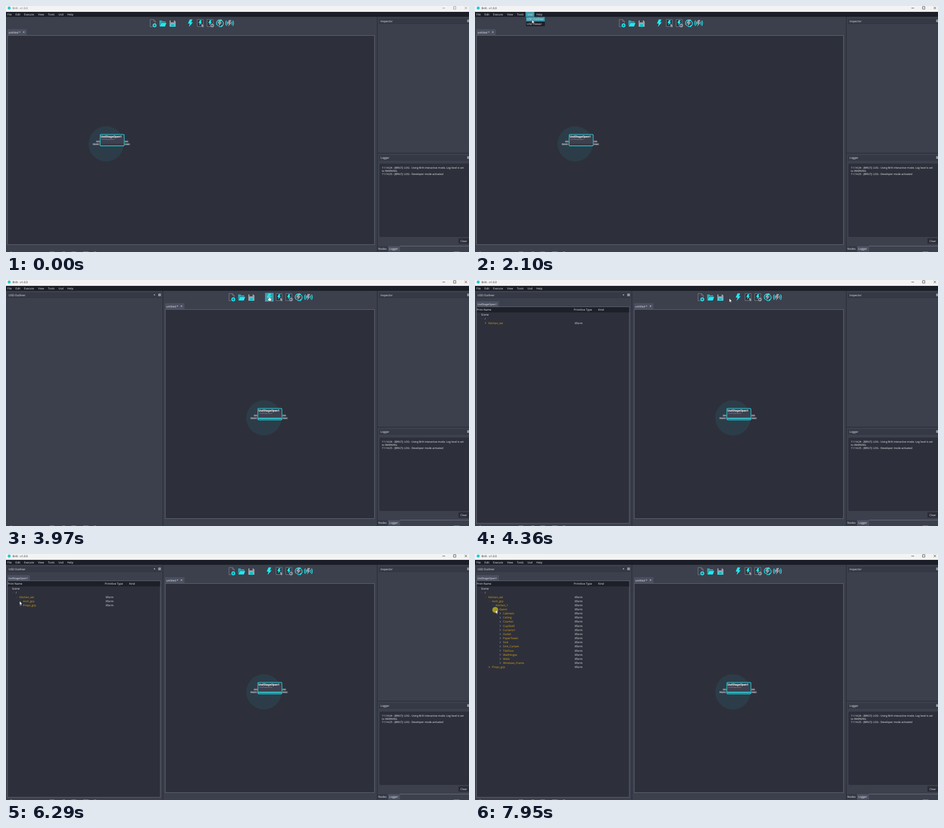
Recreate the animation shown at these times as an HTML page. Size 1026 px wide and 546 px high, loop 8 s.

```html
<!DOCTYPE html>
<html lang="en">
<head>
<meta charset="utf-8">
<title>Node editor</title>
<style>
html, body { margin: 0; width: 100%; height: 100%; overflow: hidden; background: #3c404d; }
svg { display: block; width: 1026px; height: 546px; }
text { font: 6.1px "Open Sans", "Noto Sans", sans-serif; fill: #f2f3f5; white-space: pre; text-rendering: geometricPrecision; }
.log { font-size: 5.75px; }
.name { font: bold 6.45px Roboto, sans-serif; fill: #fff; }
.kind { font: 4.1px Roboto, sans-serif; fill: #858a96; }
.port { font: 3.9px Roboto, sans-serif; fill: #d6d8dc; }
.prim { fill: #e5a50f; }
.line { fill: none; stroke: #e4e6ea; stroke-width: .8; }
.cy { fill: #1fe9ef; }
.cyl { fill: none; stroke: #1fe9ef; stroke-width: 1.5; }
.gray { fill: #9b9fa8; }
.frame { fill: none; stroke: #8a8e98; stroke-width: .9; }
</style>
</head>
<body>
<svg id="stage" viewBox="0 0 1026 546" xmlns="http://www.w3.org/2000/svg"></svg>
<script>
const LOOP = 8000, STEP = 65.7;
const DOCK = 2110, RUN = 3900, FILL = 4030, ACTIVE = 1250;
const CLICKS = [5560, 6560, 7290, 7950];
const PARTS = ["Cabinets", "Ceiling", "Counter", "CupShelf", "Curtains1", "Outlet", "PaperTowel",
  "Sink", "Sink_Curtain", "TileFloor", "WallHinges", "Walls", "Windows_Frame"];

// Pointer moves: start, end, x, y, sag of the arc
const MOVES = [
  [60, 920, 140, 42, 0], [990, 1200, 121, 20, 0], [1500, 1840, 126, 30, 0],
  [2040, 2230, 127, 32, 0], [2500, 3360, 584, 40, 165], [3430, 3630, 583, 36, 0],
  [4240, 5100, 22, 102, 24], [5310, 5500, 22, 95, 0], [5680, 6020, 30, 105, 0],
  [6220, 6290, 31, 104, 0], [6430, 6500, 32, 104, 0], [6680, 6960, 35, 119, 0],
  [6990, 7090, 38, 113, 0], [7430, 7880, 45.5, 124, 0]
];

const rect = (x, y, w, h, fill, more = "") =>
  `<rect x="${x}" y="${y}" width="${w}" height="${h}" fill="${fill}" ${more}/>`;
const text = (x, y, s, cls = "") => `<text x="${x}" y="${y}" class="${cls}">${s}</text>`;
const path = (d, cls, more = "") => `<path d="${d}" class="${cls}" ${more}/>`;
const group = (id, body, more = "") => `<g id="${id}" ${more}>${body}</g>`;
const bolt = (x, y, k, cls) =>
  path("M4 0H10L7 6.5H11L2 16.5L4 9.3H0Z", cls, `transform="translate(${x} ${y}) scale(${k})"`);
const cross = (x, y, r) => path(`M${x - r} ${y - r}l${2 * r} ${2 * r}m0 ${-2 * r}l${-2 * r} ${2 * r}`, "line");
const floatIcon = (x, y) => path(`M${x} ${y}h4.6v4.6h-4.6zM${x + 1.5} ${y + 1.6}h1.6v1.6h-1.6z`, "line");
const header = (x, y, w, s) => rect(x, y, w, 12, "#353945") +
  rect(x, y + 11.3, w, .7, "#2d313c") + text(x + 4, y + 8.2, s);
const port = (x, y, w, s) => rect(x, y - 3.4, w, 4.5, "#5d616c") + text(x + .4, y, s, "port");

function titleBar() {
  return rect(0, 0, 1026, 13, "#f3f3f3") +
    '<circle cx="7" cy="4.6" r="3.3" fill="#23cbd6"/>' +
    group("chrome", '<text x="14.5" y="6.9" style="fill:inherit">Brilt - v1.0.0</text>' +
      '<path d="M967 4.6h6M991.7 1.7h5.2v5.2h-5.2zM1016.5 1.8l5.2 5.2m0-5.2l-5.2 5.2" fill="none" stroke-width=".8"/>');
}

function menuBar() {
  const items = [["File", 3], ["Edit", 21], ["Execute", 40], ["View", 71], ["Tools", 93], ["Usd", 116.3], ["Help", 136]];
  return rect(0, 13, 1026, 11, "#1b1e27") + rect(112, 13, 19.5, 11, "#3f98a9", 'id="usd"') +
    items.map(([s, x]) => text(x, 21, s)).join("");
}

function toolbar() {
  return rect(399.5, 28.5, 19, 19.5, "#3f9aab", 'id="hot"') +
    path("M319.7 30h7.5l4 4v4.5M325 46h-5.3V30M327.2 30v4h4", "frame") +
    '<circle cx="329.2" cy="43" r="4.4" class="cy"/>' +
    path("M329.2 40.5v5M326.7 43h5", "", 'stroke="#30343f" stroke-width="1.2"') +
    path("M340 45V32h5l1.5 2h7v2.5h-9.5z", "", 'fill="#22aeb9"') +
    path("M340.5 45.5l3.5-8h11.5l-3 8z", "cy") +
    path("M362.5 32h11l2.5 2.5V46h-13.5z", "gray") +
    rect(365, 32, 7, 4.2, "#3c404d") + rect(364.5, 39.5, 9.5, 6.5, "#1fe9ef") +
    path("M366 41.6h6.5M366 43.7h6.5", "", 'stroke="#3c404d" stroke-width=".7"') +
    bolt(403.2, 29.8, 1, "cy") +
    [423.8, 445.5].map(x => path(`M${x} 30h13.4v15.6h-13.4z`, "frame", 'style="fill:#30343f"') +
      bolt(x + 3, 31.5, .7, "cy")).join("") +
    path("M433.3 38.8v7.6l1.8-1.6 1.2 2.6 1.4-.6-1.2-2.6h2.3z", "gray") +
    '<circle cx="457" cy="43.3" r="4" class="gray"/>' +
    path("M455.4 41.5v3.6l2.2-1.8zM458.6 41.5v3.6", "", 'fill="#3c404d" stroke="#3c404d" stroke-width=".7"') +
    bolt(468.6, 30.3, .92, "gray") +
    path("M469.5 43.6A7 7 0 0 1 476 31.3M478 32.6A7 7 0 0 1 471.5 45", "cyl") +
    path("M475.5 29.2l4 2.3-3.8 2.6zM477 47.5v-4.8h4.3z", "cy") +
    bolt(490.6, 31, .88, "gray") +
    path("M491 34.4q-2.2 3.8 0 7.6M488.7 32.2q-3.8 6 0 12M500.2 34.4q2.2 3.8 0 7.6M502.5 32.2q3.8 6 0 12", "cyl");
}

function sidePanels() {
  return rect(822, 24, 1.2, 522, "#252832") + rect(823, 326, 203, 1.2, "#252832") +
    header(826, 28, 200, "Inspector") + floatIcon(1022.5, 30.7) +
    header(826, 331, 200, "Logger") + floatIcon(1022.5, 334) +
    rect(828.4, 350.4, 200, 161.5, "#2d303b", 'stroke="#272a33" stroke-width=".8" rx="1"') +
    text(833, 361.2, "11:14:24 - [BRILT]: LOG - Using Brilt interactive mode. Log level is set", "log") +
    text(833, 368.3, "to WARNING", "log") +
    text(833, 375.4, "11:14:25 - [BRILT]: LOG - Developer mode activated", "log") +
    rect(1002.5, 515.5, 26, 12, "#2a2d37", 'rx="1.5"') + text(1007, 523.8, "Clear") +
    rect(823.5, 533, 22.5, 12, "#343844") + rect(847, 533, 26, 12, "#4d5262") +
    rect(873, 532.5, 153, .8, "#858a96") +
    text(825, 541.2, "Nodes") + text(849.3, 541.2, "Logger");
}

function node() {
  return '<circle cx="222" cy="306" r="39" fill="#2c3d49"/>' +
    port(199.5, 301.8, 8, "exec") + port(192, 307.9, 15.5, "filepath") +
    port(263, 301.8, 7.6, "exec") + port(263, 307.9, 12, "stage") +
    rect(208.6, 284.9, 53.4, 25.6, "#3c414f", 'rx="2.6"') +
    rect(209.5, 305.8, 51.6, 3, "#333741") +
    rect(209.5, 305.8, 51.6, 2.6, "#2fd3df", 'id="bar"') +
    rect(208.6, 284.9, 53.4, 25.6, "none", 'rx="2.6" stroke="#27d3df" stroke-width="1.3"') +
    text(210, 291.6, "UsdStageOpen1", "name") + text(211, 296.8, "(UsdStageOpen)", "kind");
}

function outliner() {
  return header(2, 28, 342, "USD Outliner") + cross(329, 33, 1.3) + floatIcon(338, 30.7) +
    rect(347, 24, 1.2, 522, "#252832") +
    group("tree", rect(3, 47, 50, 12.5, "#4b5060") +
      `<text x="5.3" y="55.5" class="log">UsdStageOpen1</text>` +
      rect(3.5, 59.5, 338.5, 480.5, "#2d303b", 'stroke="#747985" stroke-width=".8"') +
      rect(4, 60, 337.6, 12, "#1d2029") +
      text(4, 68.4, "Prim Name") + text(219, 68.4, "Primitive Type") + text(273, 68.4, "Kind") +
      group("rows", ""));
}

const stage = document.getElementById("stage");
stage.innerHTML = rect(0, 0, 1026, 546, "#3c404d") + titleBar() + menuBar() +
  group("tools", toolbar()) +
  rect(3.5, 65.5, 813, 464, "#2d303b", 'id="canvas" stroke="#747985" stroke-width=".8"') +
  group("doc", rect(3, 51.5, 43, 13.8, "#4b5060") + text(5.4, 60.9, "untitled *") +
    cross(39.4, 58, 1.7) + node()) +
  sidePanels() + group("outliner", outliner()) +
  [[10, 3], [97, 10], [125, 6], [145, 10], [171, 12], [195, 5], [992, 13]]
    .map(([x, w]) => rect(x, 545, w, 1, "#8d919a")).join("") +
  group("menu", rect(113, 24, 42, 21, "#1d2029", 'stroke="#343844" stroke-width=".5"') +
    rect(113.3, 24.3, 41.4, 10, "#3f98a9", 'id="pick"') +
    text(115, 31.3, "USD Outliner") + text(115, 41.7, "USD Viewer")) +
  '<circle id="ring" r="6.6" fill="#a39b22"/>' +
  group("pointer", path("M0 0V8.3L1.9 6.5 3.2 9.4 4.6 8.8 3.3 6H5.9Z", "", 'id="arrow"') +
    path("M-1 0Q0-1.2 1 0V4L4.2 4.8Q5.2 5.2 5 6.4L4.3 10.5H-.8L-3.2 6.8Q-3.4 5.2-1.8 5.8L-1 6.6Z", "", 'id="hand"'),
    'fill="#fff" stroke="#20232b" stroke-width=".5"');

const el = {};
stage.querySelectorAll("[id]").forEach(e => el[e.id] = e);
const show = (id, on) => el[id].setAttribute("display", on ? "inline" : "none");
const shift = (id, x, y = 0) => el[id].setAttribute("transform", `translate(${x} ${y})`);

function pointerAt(t) {
  let x = 915, y = 548;
  for (const [a, b, nx, ny, sag] of MOVES) {
    if (t < a) break;
    const u = Math.min(1, (t - a) / (b - a)), p = u * u * (3 - 2 * u);
    x += (nx - x) * p;
    y += (ny - y) * p + sag * Math.sin(Math.PI * p);
  }
  return [x, y];
}

// Each row: name, depth, expanded (undefined when there is no arrow)
function treeRows(level) {
  const rows = [["Scene", 0, true], ["/", 1, true], ["Kitchen_set", 2, level > 0]];
  if (level > 0) rows.push(["Arch_grp", 3, level > 1]);
  if (level > 1) rows.push(["Kitchen_1", 4, level > 2]);
  if (level > 2) rows.push(["Geom", 5, level > 3]);
  if (level > 3) PARTS.forEach(s => rows.push([s, 6, false]));
  if (level > 0) rows.push(["Props_grp", 3, false]);
  return rows;
}

let treeKey = "";
function drawTree(level, hover) {
  const key = level + ":" + hover;
  if (key === treeKey) return;
  treeKey = key;
  el.rows.innerHTML = treeRows(level).map(([s, depth, open], i) => {
    const x = 13.5 + 8.1 * depth, y = 77 + 9.16 * i;
    const arrow = open ? `M${x - 8} ${y - 1}l2 2 2-2` : `M${x - 7.3} ${y - 2}l2 2-2 2`;
    const color = open || i === hover ? "#414654" : "#b5b9c1";
    return path(arrow, "", `fill="none" stroke="${color}" stroke-width=".8"`) +
      text(x, y + 2.2, s, depth > 1 ? "prim" : "") +
      (depth > 1 ? text(220.7, y + 2.2, "Xform") : "");
  }).join("");
}

function draw(t) {
  const [x, y] = pointerAt(Math.floor((t + 12) / STEP) * STEP);
  const docked = t >= DOCK, filled = t >= FILL;
  const hot = docked && x > 574 && x < 593 && y > 28 && y < 49;
  const menuOpen = t >= 1320 && !docked;

  el.chrome.setAttribute("fill", t >= ACTIVE ? "#1c1c1c" : "#5c5c5c");
  el.chrome.setAttribute("stroke", "none");
  el.chrome.lastChild.setAttribute("stroke", t >= ACTIVE ? "#1c1c1c" : "#777");
  show("usd", t >= 1180 && !docked);
  show("menu", menuOpen);
  show("pick", y > 24.5);

  shift("tools", docked ? 174.5 : 0);
  shift("doc", docked ? 349.5 : 0);
  el.canvas.setAttribute("x", docked ? 353 : 3.5);
  el.canvas.setAttribute("width", docked ? 463.5 : 813);
  show("outliner", docked);
  show("tree", filled);
  show("bar", t >= RUN);
  show("hot", hot);

  const level = CLICKS.filter(c => t >= c).length;
  const hover = filled && x < 342 ? Math.floor((y - 72.4) / 9.16) : -1;
  drawTree(level, hover);

  show("ring", CLICKS.some(c => t >= c && t < c + 66));
  shift("ring", x - .6, y);
  shift("pointer", x, y);
  show("arrow", !hot);
  show("hand", hot);
}

const start = performance.now();
function tick() {
  draw((performance.now() - start) % LOOP);
  requestAnimationFrame(tick);
}
tick();
</script>
</body>
</html>
```
